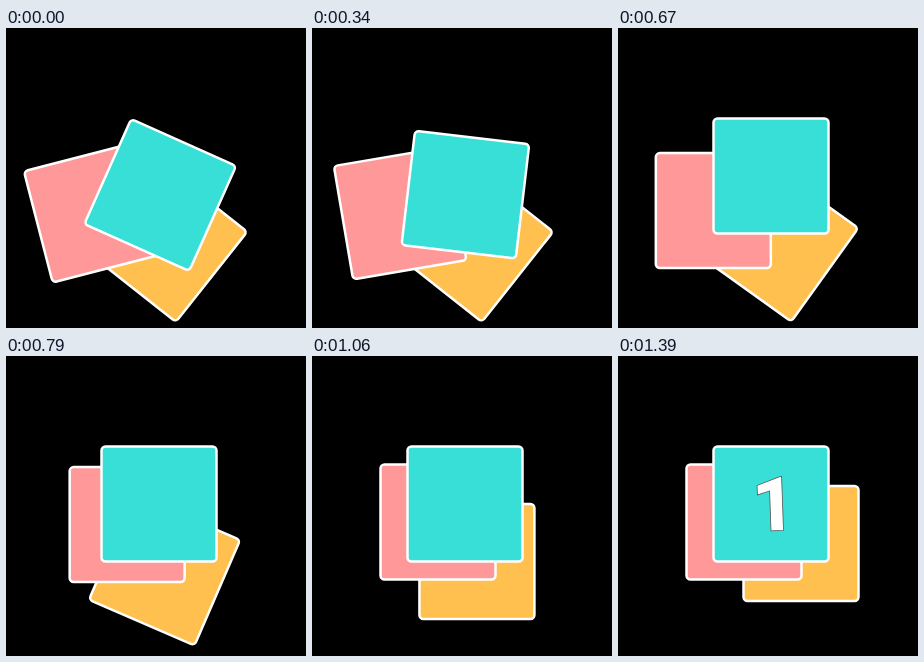
Write an HTML page that moves like this. It is 300 px wide and 300 px high and loops after 2.1 s.

```html
<!DOCTYPE html>
<html lang="en">
<head>
<meta charset="utf-8">
<title>Cards</title>
<style>
  html, body { margin: 0; width: 100%; height: 100%; overflow: hidden; background: #000; }
  svg { display: block; width: 100vw; height: 100vh; }
  rect { stroke: #fff; stroke-width: 2.5; }
  text { font: 900 76px Roboto, sans-serif; text-anchor: middle; fill: #fff; stroke: #555; stroke-width: 0.8; }
</style>
</head>
<body>
<svg viewBox="0 0 300 300">
  <rect id="orange" x="-57.5" y="-57.5" width="115" height="115" rx="4" fill="#ffc04f"/>
  <rect id="pink" x="-57.5" y="-57.5" width="115" height="115" rx="4" fill="#ff9999"/>
  <rect id="teal" x="-57.5" y="-57.5" width="115" height="115" rx="4" fill="#37dfd6"/>
  <text id="digit" x="155.5" y="175" transform="rotate(-2 151 148)">1</text>
</svg>
<script>
const LOOP = 2100;
const $ = id => document.getElementById(id);

// Each card straightens during `spin`, then slides home during `slide`.
const cards = [
  { el: $('orange'), angle: 38.3, spin: [645, 1020], slide: [1020, 1240],
    start: [160.4, 213.2], turned: [155.7, 214.8], home: [183, 187.5] },
  { el: $('pink'), angle: -14.5, spin: [185, 650], slide: [650, 870],
    start: [88, 184.5], turned: [88.5, 186.3], home: [126, 166] },
  { el: $('teal'), angle: 24.1, spin: [0, 500], slide: [415, 635],
    start: [154.2, 167], turned: [153, 166.5], home: [153, 148] }
];

const progress = (t, [a, b]) => Math.min(1, Math.max(0, (t - a) / (b - a)));
const easeOut = p => 1 - (1 - p) ** 2;
const mix = (a, b, p) => a + (b - a) * p;

function draw(t) {
  for (const c of cards) {
    const turn = progress(t, c.spin);
    const move = easeOut(progress(t, c.slide));
    const [x, y] = c.home.map((h, i) => mix(mix(c.start[i], c.turned[i], turn), h, move));
    // The front card slows slightly while it turns
    const p = c.el.id === 'teal' ? turn + 0.18 * turn * (1 - turn) : turn;
    c.el.setAttribute('transform', `translate(${x} ${y}) rotate(${c.angle * (1 - p)})`);
  }
  $('digit').setAttribute('opacity', progress(t, [1240, 1380]));
}

const begin = performance.now();
function tick() {
  draw((performance.now() - begin) % LOOP);
  requestAnimationFrame(tick);
}
draw(0);
requestAnimationFrame(tick);
</script>
</body>
</html>
```
